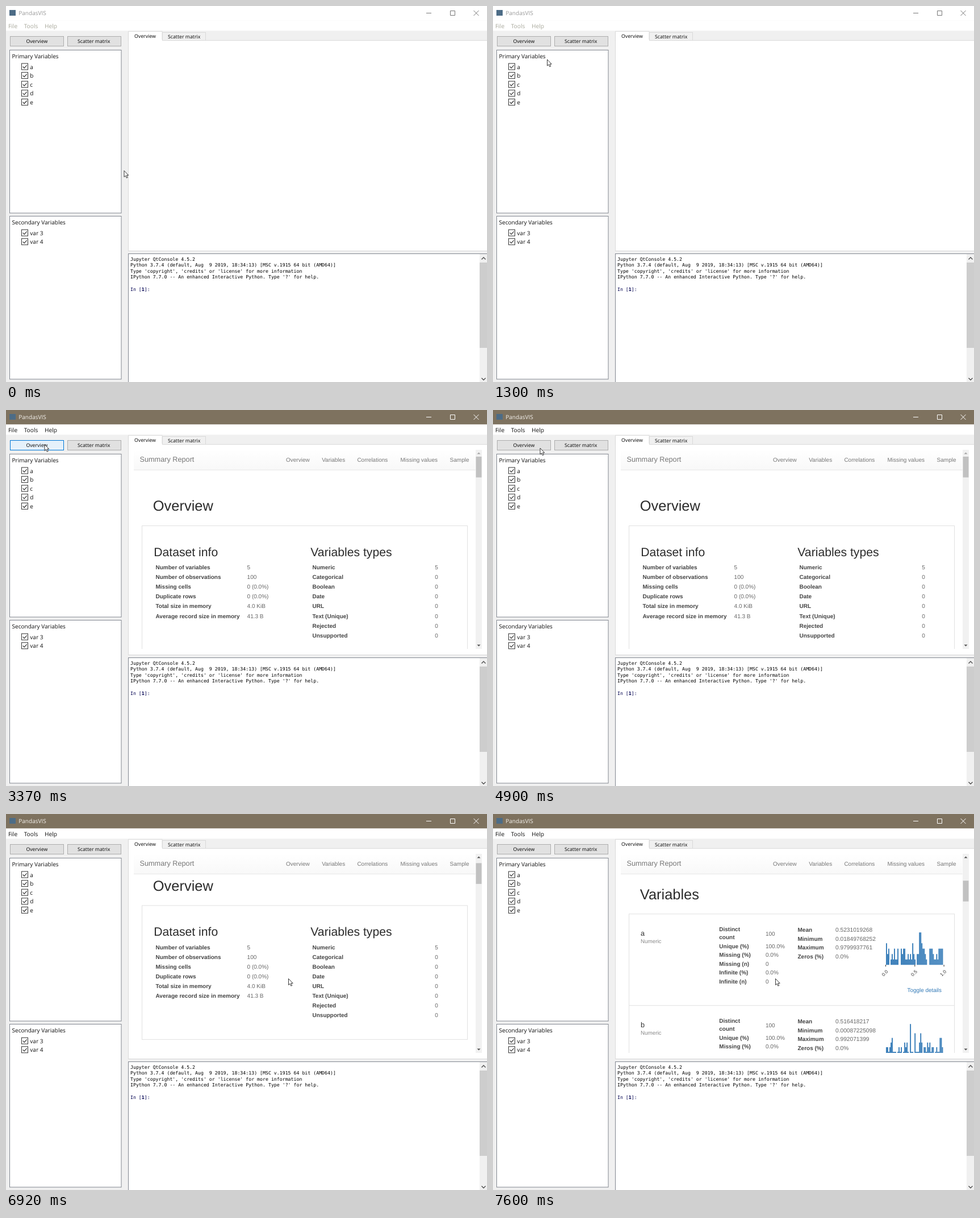
Animation of 847 by 661 pixels, one loop 8 s. Source, as an HTML page:

```html
<!DOCTYPE html>
<html lang="en">
<head>
<meta charset="utf-8">
<title>PandasVIS</title>
<style>
html, body { margin: 0; width: 100%; height: 100%; overflow: hidden; background: #f0f0f0; }
svg { display: block; width: 847px; height: 661px; text-rendering: geometricPrecision; }
text { white-space: pre; }
.ui { font: 10.05px "Open Sans", sans-serif; }
.btn { font: 8.7px "Noto Sans", sans-serif; }
.web { font: 10px "Liberation Sans", Arial, sans-serif; }
.con { font: 8.24px "DejaVu Sans Mono", monospace; }
.b { font-weight: bold; }
</style>
</head>
<body>
<svg id="stage" viewBox="0 0 847 661"></svg>
<script>
const text = (cls, x, y, str, fill = '#111', size = '') =>
  `<text class="${cls}" x="${x}" y="${y}" fill="${fill}"${size && ` style="font-size:${size}px"`}>${str}</text>`;
const rect = (x, y, w, h, fill, stroke = 'none', extra = '') =>
  `<rect x="${x}" y="${y}" width="${w}" height="${h}" fill="${fill}" stroke="${stroke}" ${extra}/>`;
const path = (d, stroke, extra = '') => `<path d="${d}" fill="none" stroke="${stroke}" ${extra}/>`;
const tri = (x, y, dir, id) => `<path id="${id}" d="M${x - 3} ${y + dir * 1.5}h6l-3 ${-dir * 3}z" fill="#505050"/>`;

const checkItem = (label, y) =>
  `<g class="box" stroke="#333">${rect(27.5, y - 5.5, 11, 11, '#fff', 'inherit')}
  <path d="M29.7 ${y}l2.4 2.6 4.6-5" fill="none" stroke-width="1.2"/></g>` + text('ui', 42.3, y + 4.1, label);

const button = (x, id) => rect(x + .5, 53.5, 94, 17, '#e1e1e1', '#adadad', `id="${id}"`);

function titleBar() {
  return rect(0, 0, 847, 25.5, '#fff', 'none', 'id="bar"') + rect(0, 25.5, 847, 18, '#fff') +
    rect(6, 7, 11, 10, '#4d6c86') +
    `<g id="title">${text('ui', 22.2, 16, 'PandasVIS', 'currentColor')}</g>
    <g id="menu">${['File', 'Tools', 'Help'].map((s, i) =>
      text('ui', [4, 31.7, 68][i], 38.8, s, 'currentColor', 10.2)).join('')}</g>` +
    path('M740 12.5h9M782.5 8.5h8v8h-8zM823.5 8l9 9m0-9l-9 9', '#777', 'id="controls"');
}

function sidebar() {
  return button(7, 'run') + button(108, 'matrix') +
    text('btn', 35.4, 65.2, 'Overview') + text('btn', 126, 65.2, 'Scatter matrix') +
    rect(6.5, 77.5, 196.5, 286.5, '#fff', '#828790') + rect(6.5, 369.5, 196.5, 286.5, '#fff', '#828790') +
    text('ui', 10.5, 92.2, 'Primary Variables') + text('ui', 10.5, 384.3, 'Secondary Variables') +
    [...'abcde'].map((s, i) => checkItem(s, 106.5 + 15.6 * i)).join('') +
    checkItem('var 3', 398.7) + checkItem('var 4', 414.3);
}

function tabs() {
  return rect(215.5, 60.5, 640, 370, '#fff', '#dadada') +
    rect(275.5, 46.5, 76, 14, '#f0f0f0', '#d9d9d9') +
    path('M215.5 61V44.5H275V61', '#d9d9d9', 'style="fill:#fff"') + rect(216, 59, 58.8, 3, '#fff') +
    text('btn', 226, 56, 'Overview') + text('btn', 285, 56.6, 'Scatter matrix');
}

function consolePane() {
  const lines = ['Jupyter QtConsole 4.5.2',
    'Python 3.7.4 (default, Aug  9 2019, 18:34:13) [MSC v.1915 64 bit (AMD64)]',
    "Type 'copyright', 'credits' or 'license' for more information",
    "IPython 7.7.0 -- An enhanced Interactive Python. Type '?' for help.", '',
    'In [<tspan class="b">1</tspan>]:'];
  return rect(215.5, 435.5, 640, 240, '#fff', '#828790') +
    lines.map((s, i) => text('con', 219, 447.6 + 10.62 * i, s, i == 5 ? '#000050' : '#000')).join('') +
    rect(834, 436, 13, 225, '#f0f0f0') + rect(834, 451, 13, 150, '#cdcdcd') +
    path('M837.5 445.5l3.5-3.5 3.5 3.5M837.5 654l3.5 3.5 3.5-3.5', '#505050', 'stroke-width="1.4"');
}

function infoTable(x, valueX, rows) {
  return rows.map(([name, value], i) => {
    const y = 280.2 + 17.07 * i;
    return text('web b', x, y, name, '#444') + text('web', valueX, y, value, '#666');
  }).join('');
}

function histogram(counts, base) {
  const unit = 57 / Math.max(...counts);
  const bars = [...counts].map((n, i) => rect(692 + 2.01 * i, base - n * unit, 1.85, n * unit, '#337ab7')).join('');
  const ticks = ['0.0', '0.5', '1.0'].map((s, i) => {
    const x = 691.5 + 51.3 * i;
    return path(`M${x} ${base}v3`, '#222') +
      `<g transform="translate(${x - 3.5} ${base + 20.5}) rotate(-45)">${text('web', 0, 0, s, '#333', 8.2)}</g>`;
  }).join('');
  return bars + ticks;
}

// One variable card; top is the upper edge of its panel.
function variable(name, top, stats, counts) {
  const left = [['Unique (%)', '100.0%'], ['Missing (%)', '0.0%'], ['Missing (n)', '0'], ['Infinite (%)', '0.0%'], ['Infinite (n)', '0']];
  const right = ['Mean', 'Minimum', 'Maximum', 'Zeros (%)'];
  return text('web', 260, top + 38, name, '#333', 12.7) + text('web', 260, top + 51.3, 'Numeric', '#888', 9.8) +
    text('web b', 398.3, top + 30.8, 'Distinct', '#444') + text('web b', 398.3, top + 44.8, 'count', '#444') +
    text('web', 480, top + 38, '100', '#666') +
    left.map(([k, v], i) => text('web b', 398.3, top + 60 + 15.6 * i, k, '#444') +
      text('web', 480, top + 60 + 15.6 * i, v, '#666')).join('') +
    right.map((k, i) => text('web b', 536.5, top + 31.5 + 15.6 * i, k, '#444') +
      text('web', 603, top + 31.5 + 15.6 * i, stats[i], '#666', 10.2)).join('') +
    histogram(counts, top + 89.5) + text('web', 729.6, top + 137.2, 'Toggle details', '#337ab7', 9.9);
}

function report() {
  const links = ['Overview', 'Variables', 'Correlations', 'Missing values', 'Sample'];
  const page = text('web', 258.8, 177.3, 'Overview', '#2b2b2b', 25.44) +
    rect(239.5, 203.5, 573, 235.5, '#fff', '#e1e1e1') +
    text('web', 260.2, 257, 'Dataset info', '#2b2b2b', 21.2) +
    text('web', 536.3, 257, 'Variables types', '#2b2b2b', 21.2) +
    infoTable(263.5, 424.6, [['Number of variables', 5], ['Number of observations', 100], ['Missing cells', '0 (0.0%)'],
      ['Duplicate rows', '0 (0.0%)'], ['Total size in memory', '4.0 KiB'], ['Average record size in memory', '41.3 B']]) +
    infoTable(539.5, 755.3, ['Numeric', 'Categorical', 'Boolean', 'Date', 'URL', 'Text (Unique)', 'Rejected', 'Unsupported']
      .map((s, i) => [s, i ? 0 : 5])) +
    text('web', 258.8, 490.5, 'Variables', '#2b2b2b', 25.44) +
    rect(239.5, 516.5, 573, 400, '#fff', '#e1e1e1') + path('M239 677.5H813', '#e1e1e1') +
    variable('a', 516.5, ['0.5231019268', '0.01849768252', '0.9799937761', '0.0%'],
      '42301213113003233112121421022664332100333211213333') +
    variable('b', 677.5, ['0.516418217', '0.00087225098', '0.992071399', '0.0%'],
      '22123411101212013231071105111353022132312201211442');
  return `<g id="report"><g clip-path="url(#view)"><g id="page">${page}</g></g>` +
    rect(225, 69, 601.5, 36.5, 'url(#nav)') + path('M225 105.5H826.5', '#e7e7e7') +
    text('web', 235.5, 91.3, 'Summary Report', '#777', 12.7) +
    links.map((s, i) => text('web', [493, 556.2, 618.4, 694.4, 781.6][i], 90.8, s, '#777')).join('') +
    rect(827, 70, 11, 350, '#f1f1f1') + rect(827.5, 82, 10, 36.5, '#c1c1c1', 'none', 'id="thumb"') +
    tri(832.5, 76, 1, 'up') + tri(832.5, 414, -1, 'down') + '</g>';
}

const stage = document.getElementById('stage');
stage.innerHTML = `<defs><clipPath id="view">${rect(225, 70, 602, 350, '#000')}</clipPath>
  <linearGradient id="nav" x2="0" y2="1"><stop stop-color="#fff"/><stop offset="1" stop-color="#f8f8f8"/></linearGradient></defs>` +
  rect(0, 0, 847, 661, '#f0f0f0') + titleBar() + sidebar() + tabs() + report() + consolePane() +
  `<circle id="click" cx="67.5" cy="60.5" r="10.5" fill="#f6e800"/>
  <path id="cursor" d="M.5.5V11.6L3 9.3l1.8 4 1.9-.9-1.8-3.8H8.2z" fill="#fff" stroke="#222" stroke-width=".9"/>`;
const el = id => document.getElementById(id);
const set = (id, attrs) => { for (const k in attrs) el(id).setAttribute(k, attrs[k]); };
const boxes = stage.querySelectorAll('.box');

// Cursor moves: start, step length, step count, route.
const moves = [
  [520, 65, 13, 'M207.5 289Q150 180 95 93.5'],
  [1350, 66, 6, 'M95 93.5L67.5 60'],
  [4900, 1, 1, 'M67.5 60L82.5 66.5'],
  [4963, 63.3, 12, 'M82.5 66.5Q300 140 517 241'],
  [5720, 63.3, 13, 'M517 241C570 230 660 230 660 270S600 335 496 272'],
  [6550, 60, 3, 'M496 272L497 289']
].map(([start, step, count, d]) => {
  const route = document.createElementNS('http://www.w3.org/2000/svg', 'path');
  route.setAttribute('d', d);
  return { start, step, count, route, length: route.getTotalLength() };
});
const wheel = [6920, 7050, 7170, 7290, 7420, 7480, 7540, 7600];

function cursorAt(t) {
  const m = moves.filter(m => t >= m.start).pop();
  if (!m) return moves[0].route.getPointAtLength(0);
  const p = Math.min(1, (Math.floor((t - m.start) / m.step + 1e-6) + 1) / m.count);
  return m.route.getPointAtLength(m.length * p * p * (3 - 2 * p));
}

function draw(t) {
  const active = t >= 2490, { x, y } = cursorAt(t);
  set('bar', { fill: active ? '#7e725f' : '#fff' });
  set('title', { color: active ? '#f4f2ee' : '#999' });
  set('menu', { color: active ? '#111' : '#a9a99c' });
  set('controls', { stroke: active ? '#fff' : '#777' });
  set('cursor', { transform: `translate(${x} ${y})` });

  const pressed = t >= 2560 && t < 3370, hover = t < 4900 && y < 71;
  set('run', {
    fill: pressed ? '#cce4f7' : hover ? '#e5f1fb' : '#e1e1e1',
    stroke: pressed ? '#005499' : hover ? '#0078d7' : '#adadad'
  });
  const row = x < 203 ? Math.floor((y - 98.7) / 15.6) : -1;
  boxes.forEach((box, i) => box.setAttribute('stroke', i == row && i < 5 ? '#0078d7' : '#333'));
  set('click', { opacity: !active || t >= 2680 ? 0 : t < 2560 ? .65 : t < 2620 ? .45 : .22 });

  const turns = wheel.filter(w => t >= w).length;
  set('report', { visibility: t >= 3370 ? 'visible' : 'hidden' });
  set('page', { transform: `translate(0 ${-42.6 * turns})` });
  set('thumb', { y: 82 + 4.4 * turns });
  set('up', { fill: turns ? '#505050' : '#a3a3a3' });
}

const begin = performance.now();
(function tick() {
  draw((performance.now() - begin) % 8000);
  requestAnimationFrame(tick);
})();
</script>
</body>
</html>
```
